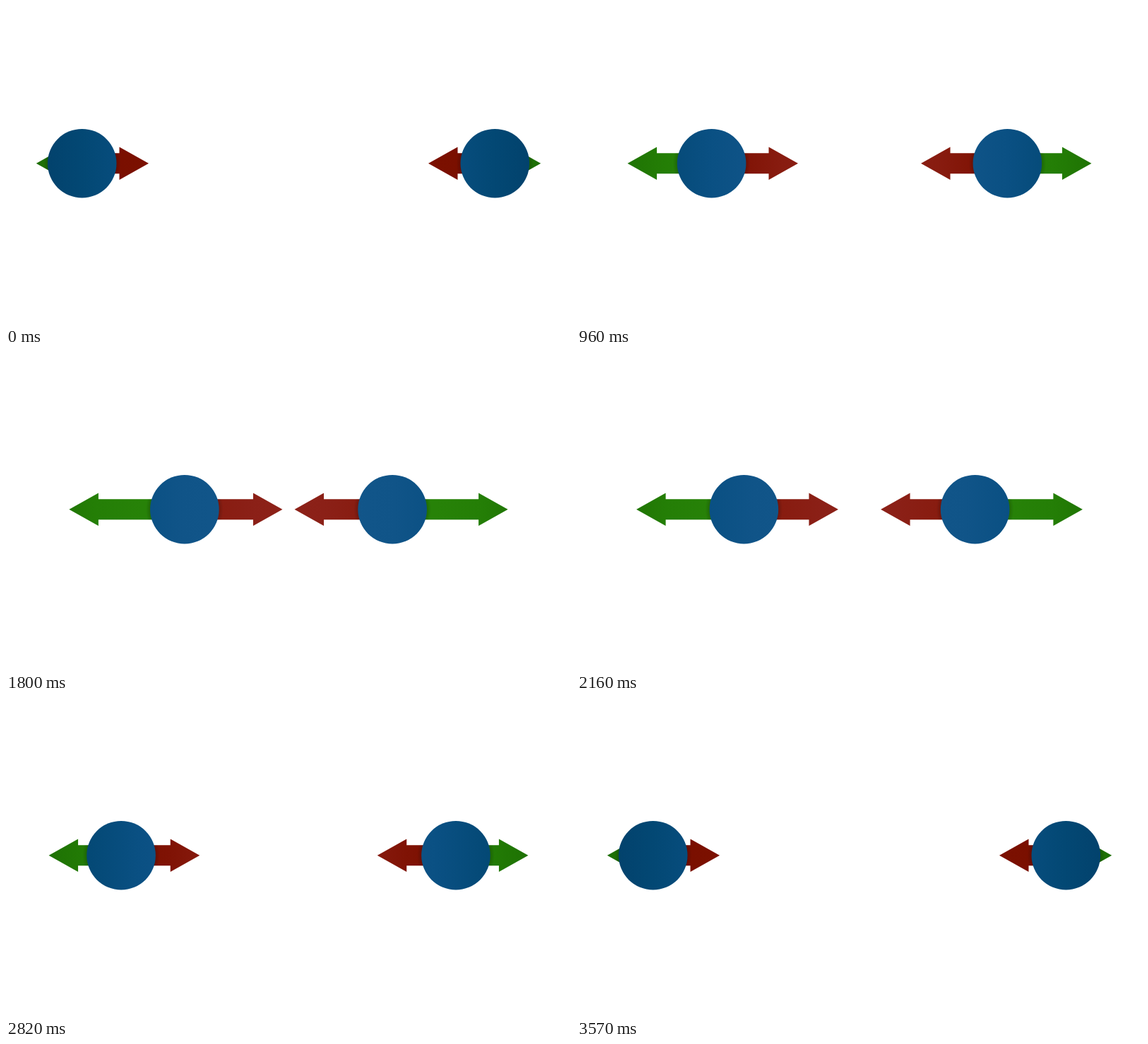
An HTML page with a canvas that plays this animation: 800 by 450 pixels, repeating every 3600 ms.

```html
<!DOCTYPE html>
<html lang="en">
<head>
<meta charset="utf-8">
<title>Two bodies</title>
<style>
  html, body { margin: 0; width: 100%; height: 100%; overflow: hidden; background: #fff; }
  canvas { display: block; width: 800px; height: 450px; }
</style>
</head>
<body>
<canvas id="stage" width="800" height="450"></canvas>
<script>
const ctx = document.getElementById('stage').getContext('2d');
const LOOP = 3600, STEP = 30, HALF = 1785, END = 3570;
const CY = 222.7, RADIUS = 48.8;
const HEAD = 41.5, HEAD_H = 23.3, SHAFT_H = 14.5;

// Start position, travel inwards, travel outwards
const BALL = [107.7, 137, 145.2];
const RED_TIP = [202, 183.4, 189.5];
const GREEN_TIP = [42.8, 47.5, 46.6];

const clamp = v => Math.min(1, Math.max(0, v));
const smooth = v => { const s = clamp(v); return s * s * (3 - 2 * s); };
const cubic = s => s < 0.5 ? 4 * s ** 3 : 1 - 4 * (1 - s) ** 3;

function place([start, inward, outward], t) {
  if (t > HALF) return start + outward * smooth((END - t) / HALF);
  const settle = smooth((t - 1440) / (HALF - 1440));
  return start + inward * cubic(t / HALF) + (outward - inward) * settle;
}

// Light falls off away from the middle of the stage
function shade(...stops) {
  const g = ctx.createLinearGradient(40, 0, 400, 0);
  for (const [x, color] of stops) g.addColorStop((x - 40) / 360, color);
  return g;
}
const BLUE = shade([40, '#02406a'], [110, '#034874'], [190, '#0a5083'], [250, '#105488'], [400, '#14588c']);
const RED = shade([40, '#760c00'], [190, '#7b1000'], [235, '#801305'], [290, '#881c10'], [350, '#8b2017'], [400, '#8d2219']);
const GREEN = shade([40, '#1d6e05'], [85, '#207604'], [125, '#247e06'], [190, '#278208'], [400, '#278208']);

function arrow(from, tip, fill) {
  const base = tip - Math.sign(tip - from) * HEAD;
  ctx.beginPath();
  ctx.moveTo(tip, CY);
  ctx.lineTo(base, CY - HEAD_H);
  ctx.lineTo(base, CY - SHAFT_H);
  ctx.lineTo(from, CY - SHAFT_H);
  ctx.lineTo(from, CY + SHAFT_H);
  ctx.lineTo(base, CY + SHAFT_H);
  ctx.lineTo(base, CY + HEAD_H);
  ctx.closePath();
  ctx.fillStyle = fill;
  ctx.fill();

  const shadow = ctx.createRadialGradient(from, CY, RADIUS, from, CY, RADIUS + 6);
  shadow.addColorStop(0, 'rgba(0,0,0,.18)');
  shadow.addColorStop(1, 'rgba(0,0,0,0)');
  ctx.fillStyle = shadow;
  ctx.fill();
}

function body(t) {
  const x = place(BALL, t);
  arrow(x, place(GREEN_TIP, t), GREEN);
  arrow(x, place(RED_TIP, t), RED);
  ctx.beginPath();
  ctx.arc(x, CY, RADIUS, 0, Math.PI * 2);
  ctx.fillStyle = BLUE;
  ctx.fill();
}

function draw() {
  const t = Math.floor((performance.now() % LOOP) / STEP) * STEP;
  ctx.setTransform(1, 0, 0, 1, 0, 0);
  ctx.fillStyle = '#fff';
  ctx.fillRect(0, 0, 800, 450);
  body(t);
  ctx.setTransform(-1, 0, 0, 1, 800, 0);
  body(t);
  requestAnimationFrame(draw);
}
draw();
</script>
</body>
</html>
```
